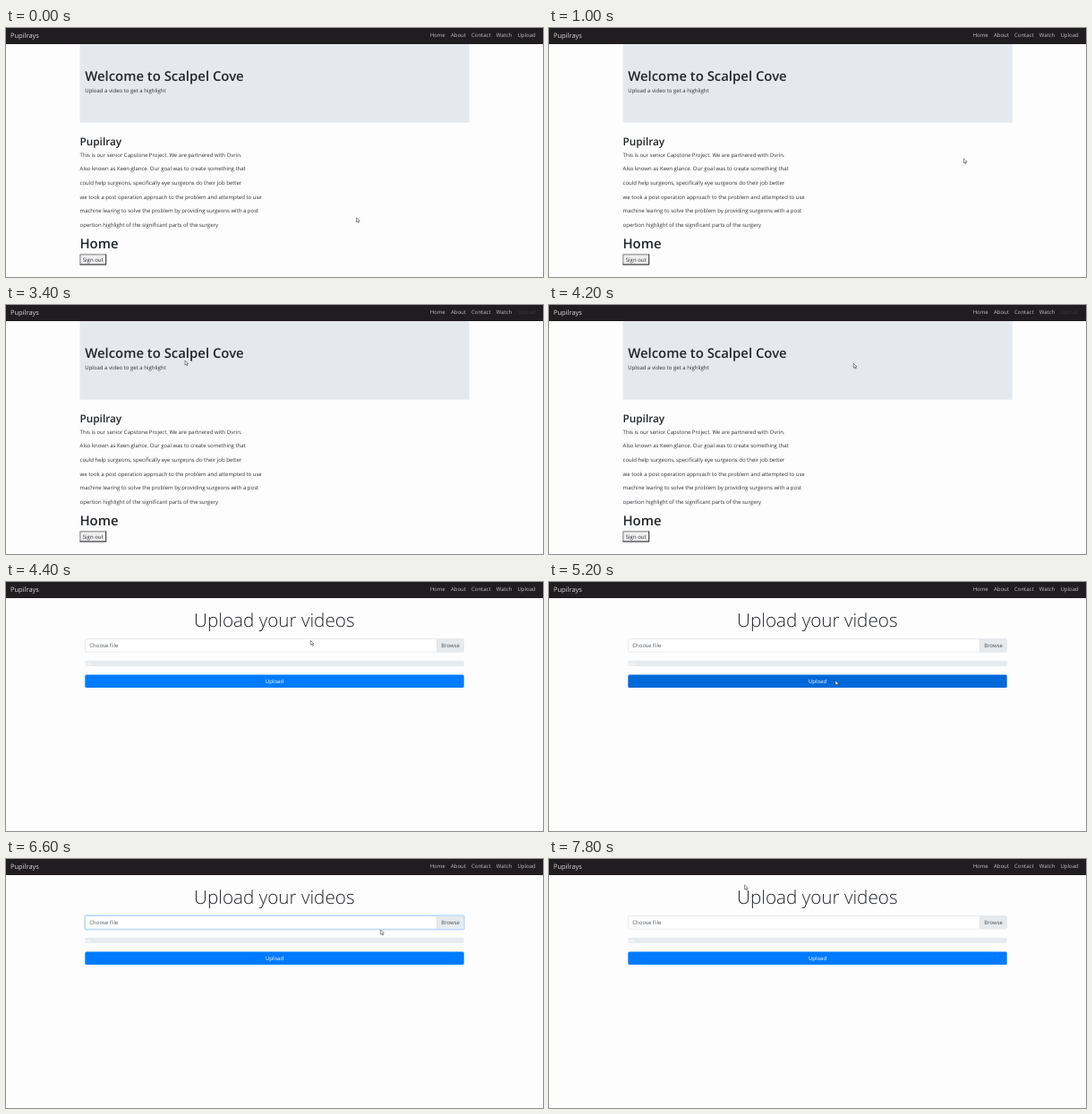
An HTML page that plays this animation: 600 px wide and 278 px high, repeating every 8000 ms.

```html
<!DOCTYPE html>
<html lang="en">
<head>
<meta charset="utf-8">
<title>Pupilrays</title>
<style>
  html, body { margin: 0; width: 100%; height: 100%; overflow: hidden; background: #fefdfe; }
  svg { display: block; width: 100vw; height: 100vh; }
  text { font: 6px "Open Sans", "Noto Sans", sans-serif; fill: #2b2f33; text-rendering: geometricPrecision; }
  .nav text { fill: #c3c1c3; }
  .nav .brand { font-size: 7.5px; fill: #d8d6d8; }
  .nav .hover { fill: #e6e4e6; }
  .nav .pressed { fill: #3a373a; }
  .big { font-size: 14.9px; font-weight: 600; fill: #212529; }
  .mid { font-size: 11.8px; font-weight: 600; fill: #212529; }
  .display { font-size: 20.7px; font-weight: 300; fill: #212529; text-anchor: middle; }
  .field text { fill: #495057; }
  .field .frame { fill: #fff; stroke: #ced4da; stroke-width: .5; }
  .ring { fill: none; stroke: #007bff; stroke-opacity: .25; stroke-width: 1.2; visibility: hidden; }
  .focus .ring { visibility: visible; }
  .focus .frame { stroke: #80bdff; }
  .submit rect { fill: #007bff; }
  .submit.hover rect { fill: #0069d9; }
  .submit text { fill: #fff; text-anchor: middle; }
</style>
</head>
<body>
<svg viewBox="0 0 600 278">
  <rect width="600" height="278" fill="#fefdfe"/>
  <g class="nav">
    <rect width="600" height="18" fill="#201d20"/>
    <text class="brand" x="5" y="10.6">Pupilrays</text>
    <text x="473.7" y="9.8">Home</text>
    <text x="497" y="9.8">About</text>
    <text x="520" y="9.8">Contact</text>
    <text x="547.8" y="9.8">Watch</text>
    <text id="link" x="571.5" y="9.8">Upload</text>
  </g>

  <g id="home">
    <rect x="82.5" y="18" width="435.2" height="87.7" fill="#e5e9ed"/>
    <text class="big" x="88.2" y="59">Welcome to Scalpel Cove</text>
    <text x="88.3" y="72.4">Upload a video to get a highlight</text>
    <text class="mid" x="82.5" y="131">Pupilray</text>
    <g id="story"></g>
    <text class="big" x="82.4" y="246">Home</text>
    <rect x="82.9" y="252.9" width="28.8" height="11.2" fill="#efeff0" stroke="#5c5c5e" stroke-width=".8"/>
    <path d="M82.5 264.1H111.7V252.5" fill="none" stroke="#303032" stroke-width=".8"/>
    <text x="97.2" y="260.8" text-anchor="middle">Sign out</text>
  </g>

  <g id="upload">
    <text class="display" x="299.8" y="49.6">Upload your videos</text>
    <g id="field" class="field">
      <rect class="ring" x="87.9" y="62.9" width="424.2" height="15.9" rx="2"/>
      <rect class="frame" x="88.5" y="63.5" width="423" height="14.7" rx="1.5"/>
      <path d="M481.5 63.8H510a1.3 1.3 0 0 1 1.3 1.3V76.6a1.3 1.3 0 0 1-1.3 1.3H481.5Z" fill="#e6eaed"/>
      <path d="M481.5 63.6V78" stroke="#ced4da" stroke-width=".5"/>
      <text x="93.3" y="73.3">Choose File</text>
      <text x="486.3" y="73.3">Browse</text>
    </g>
    <rect x="88.3" y="87.8" width="423.4" height="6.2" rx="1.5" fill="#e7ebee"/>
    <text x="88.7" y="92.6" style="font-size:4.5px;fill:#fff">0%</text>
    <g id="submit" class="submit">
      <rect x="88.3" y="103.4" width="423.4" height="14.7" rx="1.5"/>
      <text x="300" y="113">Upload</text>
    </g>
  </g>

  <path id="cursor" d="M0 0V5L1.2 4L2 5.8L2.9 5.4L2.1 3.7H3.7Z" fill="#fff" stroke="#333" stroke-width=".55" stroke-linejoin="round"/>
</svg>
<script>
const LOOP = 8000, TICK = 200, PAGE_CHANGE = 4400;
const $ = id => document.getElementById(id);

const story = [
  "This is our senior Capstone Project. We are partnered with Ovrin.",
  "Also known as Keen glance. Our goal was to create something that",
  "could help surgeons, specifically eye surgeons do their job better",
  "we took a post operation approach to the problem and attempted to use",
  "machine learing to solve the problem by providing surgeons with a post",
  "opertion highlight of the significant parts of the surgery"
];
story.forEach((line, i) => {
  const text = document.createElementNS("http://www.w3.org/2000/svg", "text");
  text.setAttribute("x", 82.6);
  text.setAttribute("y", 143.8 + i * 15.6);
  text.textContent = line;
  $("story").append(text);
});

// Pointer waypoints: time, x, y
const path = [
  [0, 391.5, 211.7], [400, 180, 51], [600, 95, 75], [1000, 463.3, 145.7], [1200, 461, 146],
  [1800, 91, 60], [2400, 519, 31], [2600, 551.7, 24.8], [2800, 580, 8], [3000, 579, 9],
  [3400, 200, 62], [3600, 134, 69], [4000, 310, 66], [4200, 340.3, 65.3], [4400, 340.3, 65.3],
  [4800, 345, 74], [5200, 320, 110], [5400, 350, 124], [5600, 420, 110], [6000, 500.6, 68.3],
  [6400, 500, 70], [7000, 256, 97.7], [7200, 256, 97.7], [7800, 218.6, 29], [8000, 218.6, 29]
];

function pointerAt(t) {
  const i = path.findIndex(p => p[0] > t);
  const [t0, x0, y0] = path[i - 1], [t1, x1, y1] = path[i];
  const k = (t - t0) / (t1 - t0);
  return [x0 + (x1 - x0) * k, y0 + (y1 - y0) * k];
}

const show = (id, on) => $(id).setAttribute("visibility", on ? "visible" : "hidden");

function draw() {
  const t = Math.floor(performance.now() % LOOP / TICK) * TICK;
  const [x, y] = pointerAt(t);
  const uploading = t >= PAGE_CHANGE;
  show("home", !uploading);
  show("upload", uploading);
  $("link").classList.toggle("hover", t === 2800);
  $("link").classList.toggle("pressed", t >= 3000 && !uploading);
  $("field").classList.toggle("focus", t >= 6200 && t < 7000);
  $("submit").classList.toggle("hover", uploading && y > 103.4 && y < 118);
  $("cursor").setAttribute("transform", `translate(${x} ${y})`);
  requestAnimationFrame(draw);
}
draw();
</script>
</body>
</html>
```
